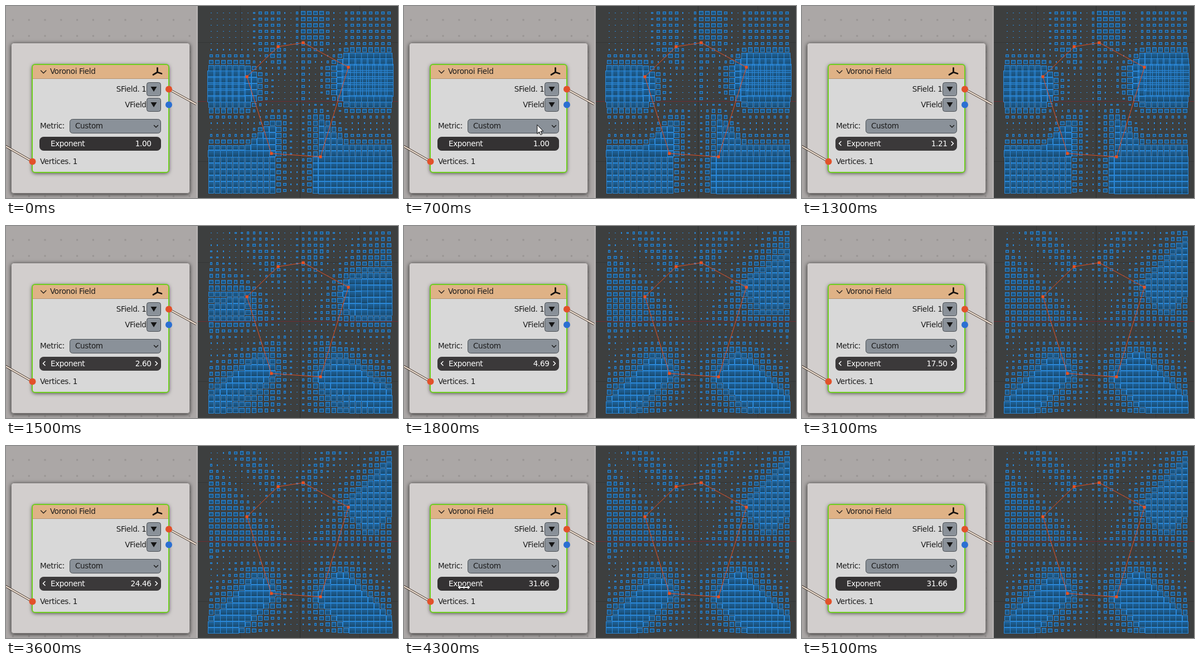
An HTML page that plays this animation: 703x345 px, repeating every 5.8 s.

```html
<!DOCTYPE html>
<html lang="en">
<head>
<meta charset="utf-8">
<title>Voronoi field exponent</title>
<style>
  html, body { margin: 0; width: 100%; height: 100%; overflow: hidden; background: #3d3f3f; }
  svg { display: block; }
  text { font: 13.6px "DejaVu Sans", sans-serif; letter-spacing: -.4px; fill: #1c1c1c; }
  .light { fill: #fff; }
  .end { text-anchor: end; }
  .button { fill: #8a9199; stroke: #4b5055; }
  .line { fill: none; stroke-linecap: round; stroke-linejoin: round; }
  .wire { fill: none; }
  #faces, #edges { shape-rendering: crispEdges; }
</style>
</head>
<body>
<svg width="703" height="345" viewBox="0 0 703 345">
  <defs>
    <linearGradient id="face" x1="0" y1="0" x2="0" y2="1">
      <stop offset="0" stop-color="#1f649d"/>
      <stop offset="1" stop-color="#18486b"/>
    </linearGradient>
    <pattern id="dots" x="-2" y="10.6" width="28.8" height="28.8" patternUnits="userSpaceOnUse">
      <circle cx="14.4" cy="14.4" r="1.7" fill="#979392"/>
    </pattern>
    <filter id="shadow" x="-10%" y="-10%" width="120%" height="120%">
      <feDropShadow dx="0" dy="1.5" stdDeviation="3.6" flood-color="#000" flood-opacity=".7"/>
    </filter>
    <clipPath id="view"><rect x="344" width="359" height="345"/></clipPath>
  </defs>

  <!-- 3D view -->
  <g clip-path="url(#view)">
    <rect x="344" width="359" height="345" fill="#3d3f3f"/>
    <path d="M420.5 0V345M634.5 0V345M344 65.5H703M344 279.5H703" stroke="#343636"/>
    <path d="M527.5 0V345" stroke="#2a302c"/>
    <path d="M344 171.5H703" stroke="#6d2b31"/>
    <g id="faces" fill="url(#face)"></g>
    <path id="edges" fill="none" stroke="#2b88d8"/>
    <path id="outline" fill="none" stroke="#e44f24"/>
    <path id="corners" fill="#f0511f"/>
  </g>

  <!-- Node editor -->
  <rect width="344" height="345" fill="#aba7a6"/>
  <rect width="340" height="345" fill="url(#dots)"/>
  <rect x="341" width="3" height="345" fill="#b4b0af"/>
  <rect x="9.5" y="66.5" width="320" height="270" rx="4" fill="#d2cecd" stroke="#827e7d" filter="url(#shadow)"/>
  <rect x="47" y="105" width="245" height="194" rx="5" fill="#d8d8d8" filter="url(#shadow)"/>
  <path d="M47 131V110a5 5 0 0 1 5-5H287a5 5 0 0 1 5 5V131Z" fill="#dfb286"/>
  <path d="M47 130.5H292" stroke="#b8946f"/>
  <rect x="47" y="105" width="245" height="194" rx="5" fill="none" stroke="#6fce20" stroke-width="2"/>
  <path class="wire" d="M-2 251L47.5 279.5M292 149.5L341 176.5" stroke="#43342c" stroke-width="4"/>
  <path class="wire" d="M-2 251L47.5 279.5M292 149.5L341 176.5" stroke="#f0e2d4" stroke-width="2.2"/>
  <path class="line" d="M62.5 116l4.7 4.7 4.7-4.7" stroke="#2a2420" stroke-width="1.4"/>
  <path class="line" d="M271.5 111.5V119L264 123.5M271.5 119L279 121.5" stroke="#17120f" stroke-width="2.8"/>
  <text x="79" y="122">Voronoi Field</text>

  <text class="end" x="251.5" y="154">SField. 1</text>
  <text class="end" x="251.5" y="182">VField</text>
  <rect class="button" x="252.5" y="137.5" width="25" height="24" rx="4"/>
  <rect class="button" x="252.5" y="165.5" width="25" height="24" rx="4"/>
  <path d="M259.5 145h11l-5.5 9ZM259.5 173h11l-5.5 9Z" fill="#141414"/>

  <text x="61" y="220">Metric:</text>
  <rect class="button" x="114.5" y="203.5" width="163" height="25" rx="5"/>
  <text x="124" y="220">Custom</text>
  <path class="line" d="M265.5 214.5l3.5 3.5 3.5-3.5" stroke="#1c1c1c" stroke-width="1.5"/>

  <rect id="slider" x="60" y="235" width="218" height="25" rx="7.5"/>
  <path id="arrows" class="line" d="M70 243.5l-3.5 3.5 3.5 3.5M268 243.5l3.5 3.5-3.5 3.5" stroke="#fff" stroke-width="1.5"/>
  <text class="light" x="80" y="252">Exponent</text>
  <text id="value" class="light end" x="260.5" y="252"></text>
  <text x="61" y="284">Vertices. 1</text>

  <circle cx="292" cy="149.5" r="6" fill="#e2512a"/>
  <circle cx="292" cy="177.5" r="6" fill="#2b6fd2"/>
  <circle cx="47.5" cy="279.5" r="6" fill="#e2512a"/>

  <g fill="#fff" stroke="#000" stroke-linejoin="round">
    <path id="pointer" d="M.5 .5V16.5L4.2 13L6.7 18.5L9.2 17.4L6.8 12H11.5Z"/>
    <path id="resize" d="M-11.5 0L-6.5-4.5V-1.5H-1V-3.5H1V-1.5H6.5V-4.5L11.5 0L6.5 4.5V1.5H1V3.5H-1V1.5H-6.5V4.5Z" stroke-width=".8"/>
  </g>
</svg>
<script>
const LOOP = 5800, STEP = 100, COUNT = 30, GAP = 11, SCALE = 0.12;
const sites = [[488, 73], [533, 66], [614, 110], [564, 271], [476, 265], [432, 127]];
const exponentKeys = [[1200, 1], [1300, 1.21], [1800, 4.69], [2600, 10.54], [3600, 24.46], [4200, 31.66]];
const cursorKeys = [[300, 500, 131], [900, 107.5, 254], [4500, 107.5, 254], [5000, 691, 51]];

const $ = id => document.getElementById(id);
const show = (el, on) => el.setAttribute("visibility", on ? "visible" : "hidden");

function track(keys, t, column = 1) {
  if (t <= keys[0][0]) return keys[0][column];
  for (let i = 1; i < keys.length; i++) {
    const a = keys[i - 1], b = keys[i];
    if (t <= b[0]) return a[column] + (b[column] - a[column]) * (t - a[0]) / (b[0] - a[0]);
  }
  return keys[keys.length - 1][column];
}

// Minkowski metric; the field is the gap between the two nearest sites.
function field(x, y, p) {
  const d = sites.map(([sx, sy]) =>
    (Math.abs(x - sx) ** p + Math.abs(y - sy) ** p) ** (1 / p));
  d.sort((a, b) => a - b);
  return d[1] - d[0];
}

const cells = [];
for (let row = 0; row < COUNT; row++) {
  for (let col = 0; col < COUNT; col++) {
    const rect = document.createElementNS("http://www.w3.org/2000/svg", "rect");
    $("faces").append(rect);
    cells.push({ rect, x: 368 + GAP * col, y: 12.5 + GAP * row });
  }
}
$("outline").setAttribute("d", "M" + sites.join("L") + "Z");
$("corners").setAttribute("d", sites.map(([x, y]) => `M${x - 2.5} ${y - 2.5}h5v5h-5Z`).join(""));

let drawnExponent;
function drawField(p) {
  if (p === drawnExponent) return;
  drawnExponent = p;
  let edges = "";
  for (const { rect, x, y } of cells) {
    const size = field(x, y, p) * SCALE;
    const s = size.toFixed(2);
    const left = (x - size / 2).toFixed(2), top = (y - size / 2).toFixed(2);
    rect.setAttribute("x", left);
    rect.setAttribute("y", top);
    rect.setAttribute("width", s);
    rect.setAttribute("height", s);
    edges += `M${left} ${top}h${s}v${s}h-${s}Z`;
  }
  $("edges").setAttribute("d", edges);
}

function draw(t) {
  $("value").textContent = track(exponentKeys, t).toFixed(2);
  drawField(track(exponentKeys, t - STEP)); // the mesh follows the number by one step

  const x = track(cursorKeys, t, 1), y = track(cursorKeys, t, 2);
  const over = x > 60 && x < 278 && y > 235 && y < 260;
  const dragging = t >= 1200 && t < 4300;
  const present = t >= 100 && t < 5100 && !dragging;
  const hot = over && t !== 4300;
  show($("arrows"), hot);
  $("slider").setAttribute("fill", hot ? "#3b393a" : "#343233");
  show($("pointer"), present && !over);
  show($("resize"), present && over);
  for (const id of ["pointer", "resize"]) $(id).setAttribute("transform", `translate(${x} ${y})`);
}

let start, last;
function tick(now) {
  start ??= now;
  const t = Math.floor((now - start) % LOOP / STEP) * STEP;
  if (t !== last) draw(last = t);
  requestAnimationFrame(tick);
}
draw(0);
requestAnimationFrame(tick);
</script>
</body>
</html>
```
